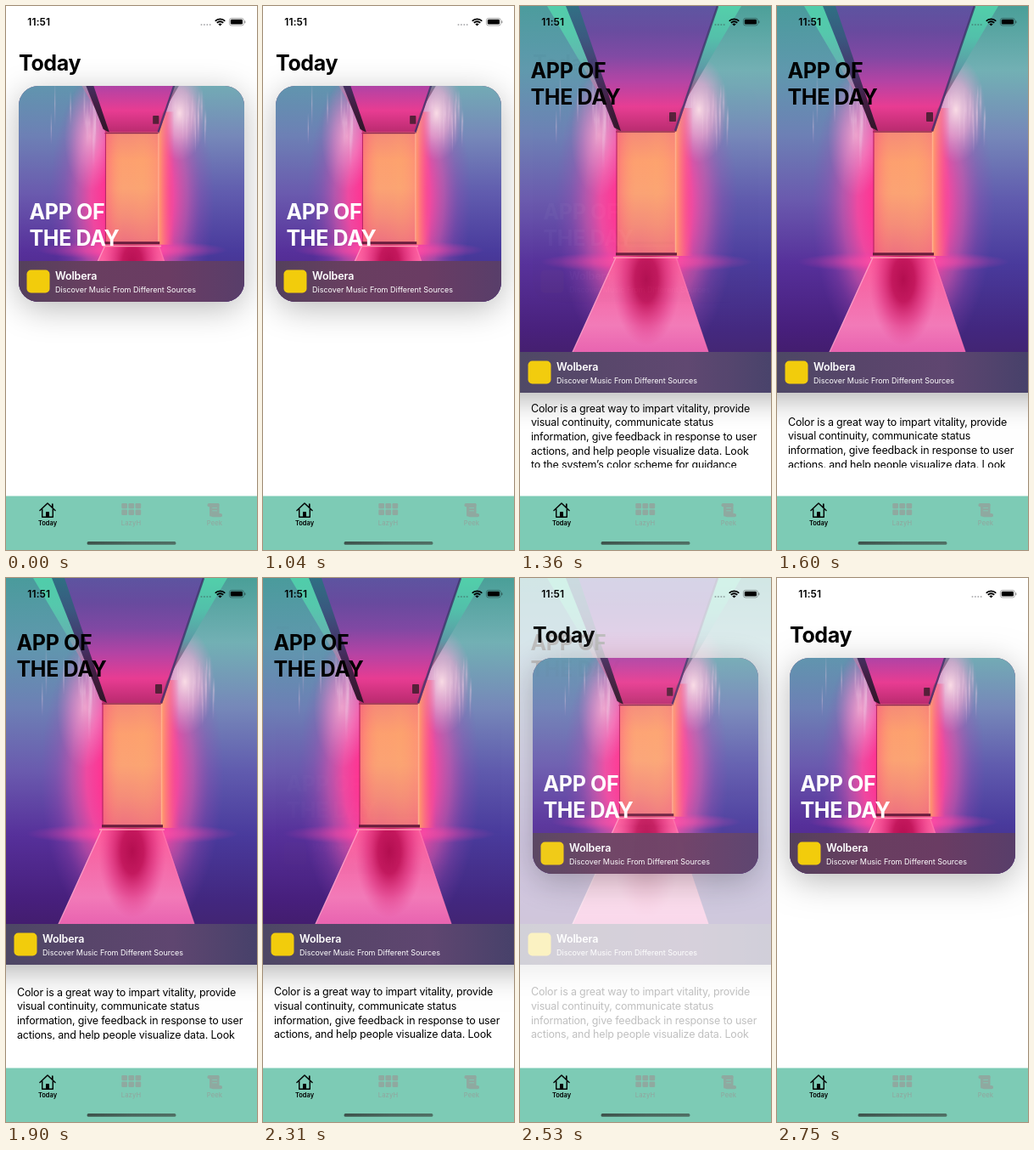
Recreate the animation shown at these times as an HTML page with a canvas. Size 296x640 px, loop 2770 ms.

```html
<!DOCTYPE html>
<html lang="en">
<head>
<meta charset="utf-8">
<title>Today card</title>
<style>
html, body { margin: 0; width: 100%; height: 100%; overflow: hidden; background: #fff; }
canvas { display: block; width: 296px; height: 640px; }
</style>
</head>
<body>
<canvas id="stage"></canvas>
<script>
const W = 296, H = 640, LOOP = 2770;
const TICKS = [0, 1040, 1150, 1260, 1360, 1480, 1600, 1700, 1800, 1900,
  2000, 2100, 2200, 2310, 2430, 2530, 2630, 2750];
const OPEN = 1040, CLOSE = 2300, FADE = 340;
const IMAGE_H = 455, BAND_H = 48, CARD = { x: 15, y: 94, w: 266, h: 254, r: 23 };
const COPY = [
  'Color is a great way to impart vitality, provide',
  'visual continuity, communicate status',
  'information, give feedback in response to user',
  'actions, and help people visualize data. Look',
  'to the system’s color scheme for guidance',
  'when picking app tint colors that look great',
  'individually and in combination, on both light',
  'and dark backgrounds.'
];

const dpr = window.devicePixelRatio || 1;

function setup(canvas) {
  canvas.width = W * dpr;
  canvas.height = H * dpr;
  const ctx = canvas.getContext('2d');
  ctx.scale(dpr, dpr);
  return ctx;
}

const stage = setup(document.getElementById('stage'));
const layer = document.createElement('canvas');
const over = setup(layer);

function text(c, str, x, y, size, weight, color, track = 0, align = 'left') {
  c.font = `${weight} ${size}px Inter, sans-serif`;
  c.letterSpacing = track + 'px';
  c.textAlign = align;
  c.fillStyle = color;
  c.fillText(str, x, y);
}

function poly(c, pts, fill) {
  c.beginPath();
  for (let i = 0; i < pts.length; i += 2) c.lineTo(pts[i], pts[i + 1]);
  c.closePath();
  c.fillStyle = fill;
  c.fill();
}

function line(c, pts, color, width) {
  c.beginPath();
  for (let i = 0; i < pts.length; i += 2) c.lineTo(pts[i], pts[i + 1]);
  c.strokeStyle = color;
  c.lineWidth = width;
  c.stroke();
}

function box(c, x, y, w, h, r, fill) {
  c.beginPath();
  c.roundRect(x, y, w, h, r);
  c.fillStyle = fill;
  c.fill();
}

function blend(gradient, colors) {
  colors.forEach((color, i) => gradient.addColorStop(i / (colors.length - 1), color));
  return gradient;
}

const down = (c, y0, y1, ...colors) => blend(c.createLinearGradient(0, y0, 0, y1), colors);
const across = (c, x0, x1, ...colors) => blend(c.createLinearGradient(x0, 0, x1, 0), colors);

// Elliptical glow, colours listed from the centre outwards.
function glow(c, x, y, rx, ry, ...colors) {
  c.save();
  c.translate(x, y);
  c.scale(rx, ry);
  c.fillStyle = blend(c.createRadialGradient(0, 0, 0, 0, 0, 1), colors);
  c.fillRect(-1, -1, 2, 2);
  c.restore();
}

function shadow(c, alpha, blur, dy, draw) {
  c.save();
  c.shadowColor = `rgba(0,0,0,${alpha})`;
  c.shadowBlur = blur * dpr;
  c.shadowOffsetY = dy * dpr;
  draw();
  c.restore();
}

// Soft corridor: two walls, ceiling, floor and a glowing end wall.
function corridor(c) {
  c.save();
  c.beginPath();
  c.rect(0, 0, W, IMAGE_H);
  c.clip();
  c.fillStyle = down(c, 0, IMAGE_H, '#4a9b9c', '#5f98ad', '#6d80b5', '#6a5aae', '#56309a', '#471f7c', '#3c1a58');
  c.fillRect(0, 0, 149, IMAGE_H);
  c.fillStyle = down(c, 0, IMAGE_H, '#4a9f98', '#72b0b4', '#7688b9', '#605bae', '#493a9c', '#42277f', '#42205f');
  c.fillRect(149, 0, 147, IMAGE_H);

  glow(c, 149, 232, 108, 205, '#ff4a94', '#ff4a94', 'rgba(255,52,146,1)', 'rgba(250,72,160,.92)',
    'rgba(222,84,172,.62)', 'rgba(180,76,176,.25)', 'rgba(150,70,175,0)');
  glow(c, 149, 301, 125, 13, 'rgba(255,90,165,.9)', 'rgba(255,70,165,.5)', 'rgba(220,60,170,0)');
  glow(c, 93, 152, 33, 72, 'rgba(255,185,215,.75)', 'rgba(250,160,210,.4)', 'rgba(230,140,200,0)');
  glow(c, 211, 122, 35, 62, 'rgba(255,225,232,.95)', 'rgba(248,180,215,.6)', 'rgba(220,150,205,0)');

  let seed = 7;
  const rnd = () => (seed = seed * 16807 % 2147483647) / 2147483647;
  for (let i = 0; i < 30; i++) {
    const x = i % 2 ? 198 + rnd() * 50 : 42 + rnd() * 62;
    const y = 80 + rnd() * 45, h = 25 + rnd() * 55;
    c.fillStyle = down(c, y, y + h, 'rgba(240,205,228,0)', 'rgba(240,205,228,.35)', 'rgba(235,170,220,0)');
    c.fillRect(x, y, 1 + rnd() * 2, h);
  }

  c.fillStyle = across(c, 184, 204, 'rgba(255,160,105,.95)', 'rgba(255,105,130,.7)', 'rgba(255,70,145,0)');
  c.fillRect(184, 120, 20, 174);

  poly(c, [66, 0, 234, 0, 184, 148, 114, 148],
    down(c, 0, 148, '#5d54a0', '#684a9e', '#8048a3', '#b443a4', '#e83c92', '#b82a6e'));
  poly(c, [32, 0, 56, 0, 110, 128, 104, 122],
    down(c, 0, 128, '#50cdaa', '#55c8ac', '#62b5b0', '#b579ad', '#d05594'));
  poly(c, [54, 0, 69, 0, 119, 147, 111, 143],
    down(c, 0, 147, '#2f6f83', '#39587f', '#45376d', '#421f44', '#301426'));
  poly(c, [233, 0, 261, 0, 189, 122, 182, 147],
    down(c, 0, 147, '#52cfaa', '#52c0aa', '#5d9aa6', '#b3497e', '#b02a58'));
  line(c, [233, 0, 183, 147], 'rgba(60,50,105,.8)', 2.5);
  box(c, 176, 125, 8, 11, 1, '#552039');

  poly(c, [112, 296, 185, 296, 222, 407, 240, 455, 40, 455, 62, 407],
    down(c, 296, 455, '#ff5c9c', '#f56aa8', '#f27ab8', '#e65dae', '#b43a8c'));
  glow(c, 149, 322, 40, 78, 'rgba(178,12,78,.98)', 'rgba(190,16,86,.9)',
    'rgba(215,35,115,.5)', 'rgba(230,60,140,0)');
  line(c, [113, 296, 62, 407, 40, 455], 'rgba(255,170,208,.75)', 1.3);
  line(c, [184, 296, 222, 407, 240, 455], 'rgba(255,120,180,.6)', 1.3);

  c.fillStyle = down(c, 147, 294, '#f58a78', '#fda06f', '#fba374', '#f58d79', '#ee6f80');
  c.fillRect(114, 147, 70, 147);
  c.fillStyle = across(c, 114, 184, 'rgba(255,70,130,.45)', 'rgba(255,150,110,0)',
    'rgba(255,180,100,.1)', 'rgba(255,110,130,.3)');
  c.fillRect(114, 147, 70, 147);
  line(c, [113, 148, 184, 148], '#8c2850', 1.5);
  line(c, [114, 147, 114, 293], '#b92665', 1.2);
  line(c, [183.5, 148, 183.5, 292], '#ffb08d', 1.5);
  line(c, [113, 291.8, 185, 291.8], '#681b3c', 3.2);
  line(c, [110, 296, 187, 296], '#ff9bb2', 1.6);
  c.restore();
}

function band(c, x, y, w, ...colors) {
  c.fillStyle = across(c, x, x + w, ...colors);
  c.fillRect(x, y, w, BAND_H);
  box(c, x + 9.5, y + 10.5, 27, 27, 5, '#f2cc0c');
  text(c, 'Wolbera', x + 43, y + 21.5, 12.5, 600, '#fff', -0.15);
  text(c, 'Discover Music From Different Sources', x + 43, y + 36.7, 9, 400, '#fff');
}

function headline(c, x, y, color) {
  text(c, 'APP OF', x, y, 25, 700, color, -0.35);
  text(c, 'THE DAY', x, y + 31, 25, 700, color, -0.35);
}

function home(c) {
  text(c, 'Today', 15, 75.5, 25, 700, '#000', -0.35);
  const { x, y, w, h, r } = CARD;
  shadow(c, 0.27, 38, 8, () => box(c, x, y, w, h, r, '#7b4a86'));
  c.save();
  c.beginPath();
  c.roundRect(x, y, w, h, r);
  c.clip();
  c.save();
  const k = w / W;
  c.translate(x, y + (h - IMAGE_H * k) / 2);
  c.scale(k, k);
  corridor(c);
  c.restore();
  band(c, x, y + h - BAND_H, w, '#54405c', '#693e60', '#6a3c63', '#583e6a');
  c.restore();
  headline(c, 27.5, 251, '#fff');
}

function detail(c, shift) {
  c.save();
  c.beginPath();
  c.rect(0, IMAGE_H, W, 543 - IMAGE_H);
  c.clip();
  COPY.forEach((row, i) => text(c, row, 13, 491.4 + i * 16.7 + shift, 12.5, 400, '#000', -0.18));
  c.restore();
  shadow(c, 0.3, 32, 8, () => {
    c.fillStyle = '#59447a';
    c.fillRect(-40, 0, W + 80, IMAGE_H);
  });
  corridor(c);
  band(c, 0, IMAGE_H - BAND_H, W, '#4d4765', '#58456a', '#5f4670', '#47416a');
  headline(c, 12.5, 84.5, '#000');
}

function statusBar(c) {
  text(c, '11:51', 25.2, 23.2, 12, 600, '#000', 0.15);
  for (let i = 0; i < 4; i++) box(c, 229.5 + i * 3.4, 21, 2, 2, 1, 'rgba(60,60,67,.4)');
  c.save();
  c.beginPath();
  c.moveTo(252.5, 23.4);
  c.arc(252.5, 23.4, 9.2, -Math.PI * 0.75, -Math.PI * 0.25);
  c.closePath();
  c.clip();
  c.strokeStyle = '#000';
  c.lineWidth = 1.9;
  for (const r of [8.2, 5.1]) {
    c.beginPath();
    c.arc(252.5, 23.4, r, Math.PI, 0);
    c.stroke();
  }
  c.beginPath();
  c.arc(252.5, 23.4, 2.9, Math.PI, 0);
  c.fillStyle = '#000';
  c.fill();
  c.restore();
  c.beginPath();
  c.roundRect(263.4, 14.4, 17, 8.6, 2.6);
  c.strokeStyle = 'rgba(0,0,0,.4)';
  c.lineWidth = 0.8;
  c.stroke();
  box(c, 264.8, 15.8, 14.2, 5.8, 1.4, '#000');
  box(c, 281.3, 17.2, 1.1, 3, 0.6, 'rgba(0,0,0,.45)');
}

function tabBar(c) {
  const idle = '#8fa9a0', tint = '#7dcbb5';
  c.fillStyle = tint;
  c.fillRect(0, 576.5, W, H - 576.5);

  c.lineJoin = c.lineCap = 'round';
  line(c, [40, 593.5, 49, 585, 58, 593.5], '#000', 1.5);
  line(c, [42.7, 592, 42.7, 601.2, 55.3, 601.2, 55.3, 592], '#000', 1.4);
  line(c, [54.8, 589.5, 54.8, 586], '#000', 1.7);
  box(c, 47, 595, 4, 6.4, 0.5, '#000');
  c.lineJoin = 'miter';
  c.lineCap = 'butt';

  for (let i = 0; i < 6; i++) {
    box(c, 136.3 + (i % 3) * 8.1, 585 + Math.floor(i / 3) * 7.6, 6.7, 6.3, 1.2, idle);
  }

  box(c, 237.5, 585, 14, 4.2, 2, idle);
  box(c, 240, 585, 11.5, 15.5, 1.5, idle);
  box(c, 242, 597, 13, 4.3, 2, idle);
  line(c, [243.2, 590.5, 249, 590.5], tint, 0.8);
  line(c, [243.2, 593.8, 249, 593.8], tint, 0.8);

  text(c, 'Today', 49, 611.3, 7.5, 600, '#000', 0, 'center');
  text(c, 'LazyH', 147.5, 611.3, 7.6, 500, idle, 0.1, 'center');
  text(c, 'Peek', 246, 611.3, 7.6, 500, idle, 0.1, 'center');
  box(c, 95.5, 630, 105, 3.8, 1.9, across(c, 95, 201, '#3d524b', '#4a665d', '#4f6f64'));
}

const ease = p => {
  p = Math.min(1, Math.max(0, p));
  return p * p * (3 - 2 * p);
};

// Damped spring: copy slides down from behind the image and overshoots a little.
function copyShift(t) {
  const s = Math.max(0, t - OPEN) / 1000, w = 5.61, d = 7.48;
  return -140 * Math.exp(-d * s) * (Math.cos(w * s) + d / w * Math.sin(w * s));
}

// Draws a whole view as one group, so its parts fade together.
function fadeView(alpha, draw) {
  if (alpha <= 0) return;
  over.clearRect(0, 0, W, H);
  draw(over);
  stage.globalAlpha = alpha;
  stage.drawImage(layer, 0, 0, W, H);
  stage.globalAlpha = 1;
}

function render(t) {
  const open = ease((t - OPEN) / FADE) - ease((t - CLOSE) / FADE);
  stage.fillStyle = '#fff';
  stage.fillRect(0, 0, W, H);
  fadeView(open, c => detail(c, copyShift(t)));
  fadeView(1 - open * open, home);
  tabBar(stage);
  statusBar(stage);
}

const start = performance.now();
let shown = -1;

function frame() {
  const now = (performance.now() - start) % LOOP;
  const tick = TICKS.findLast(t => t <= now);
  if (tick !== shown) render(shown = tick);
  requestAnimationFrame(frame);
}

frame();
</script>
</body>
</html>
```
